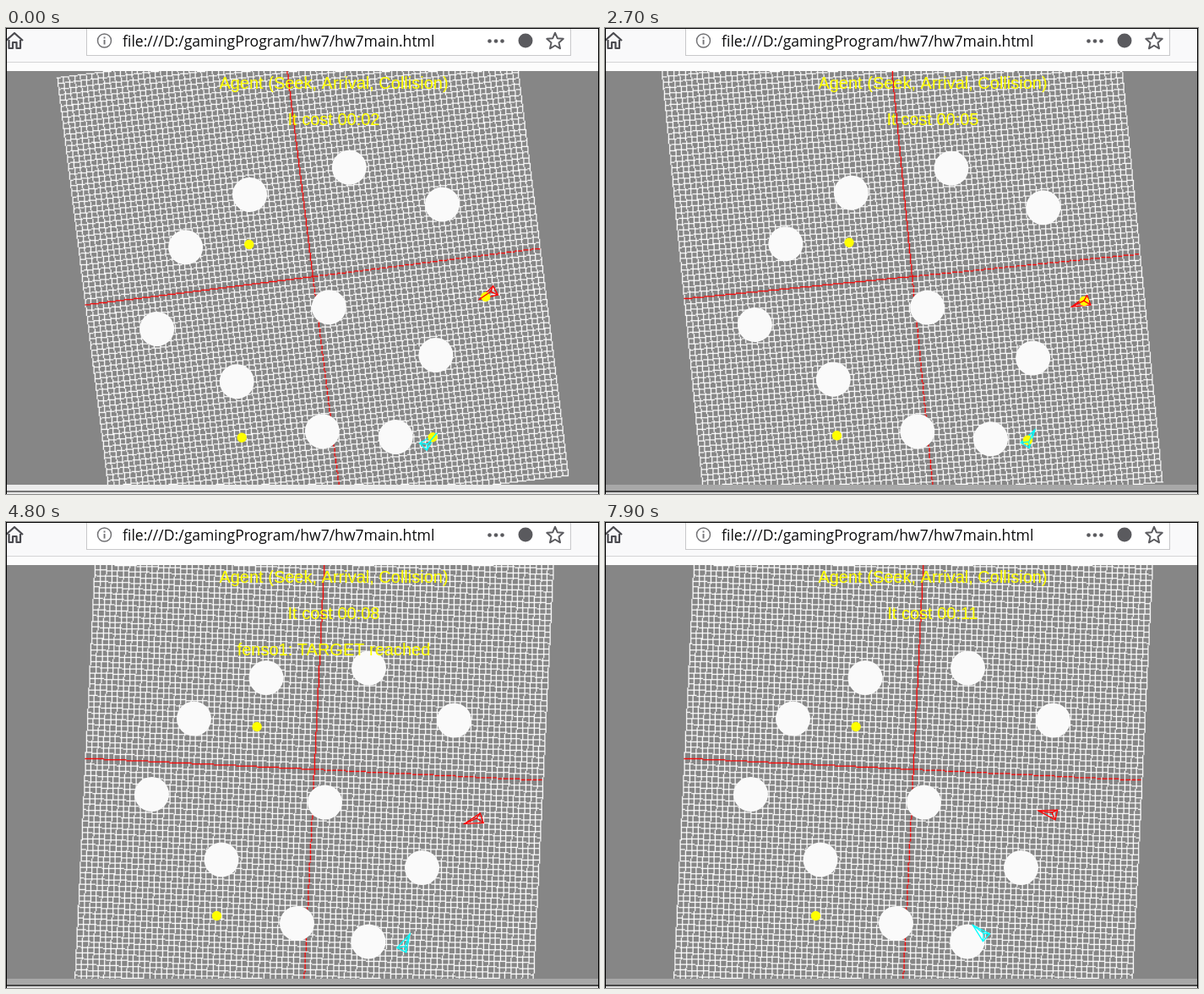
Write an HTML page with a canvas that moves like this. It is 702 px wide and 552 px high and loops after 8000 ms.

```html
<!DOCTYPE html>
<html lang="en">
<head>
<meta charset="utf-8">
<title>Agent demo</title>
<style>
html, body { margin: 0; width: 100%; height: 100%; overflow: hidden; background: #f9f9fa; }
canvas { display: block; width: 702px; height: 552px; }
</style>
</head>
<body>
<canvas id="stage" width="702" height="552"></canvas>
<script>
const ctx = document.getElementById('stage').getContext('2d');
const LOOP = 8000, STEP = 100, RAD = Math.PI / 180;
const VIEW = { x: 1, y: 51, w: 700, h: 490 };
const REST = 2.76;            // final view angle; local places are given at it
const SCALE = 1.25, HALF = 271, CELLS = 80;

// [ms, view angle]
const TURN = [[2500, -7.1], [2600, -6.25], [2700, -5.6], [2800, -2.4],
              [2900, 0.9], [3000, 2.2], [3100, REST]];
// [ms, x, y, heading]
const RED = [[0, 199.9, 56.6, 161], [800, 196.5, 59.3, 169], [1600, 194.6, 60.4, 172],
             [2600, 193, 60.7, 170], [2900, 190.9, 60.4, 162], [4800, 187.9, 61, 161.6],
             [5400, 185, 60, 172], [6300, 176.5, 56.8, 187], [6600, 173.7, 55.8, 188.5],
             [7900, 158.7, 51.5, 193]];
const CYAN = [[0, 102.9, 214.7, -35], [800, 107.8, 212.8, -45], [1600, 109.8, 211.4, -50],
              [2600, 110.8, 209.5, -49], [2900, 109, 208.6, -51], [4800, 108.1, 204.5, -63],
              [5400, 104.5, 204, -95], [6300, 93, 201.3, -140], [6600, 89.9, 199.8, -144],
              [7900, 78.4, 192, -137.6]];
const BALLS = [[64.4, -120], [165.4, -58], [-57.1, -108.5], [-142.6, -60], [-192.6, 29.5],
               [12.4, 39], [127.4, 116.5], [-110.1, 107], [-20.6, 182.5], [63.9, 204]];
const DOTS = [[-68, -50.5], [-115.6, 173.5]];
const GOALS = [[197.2, 58.5], [107.1, 211.8]];

const REACHED = 4700, MESSAGE_END = 5700, BAR_CHANGE = 2400;

function track(keys, t) {
  if (t <= keys[0][0]) return keys[0].slice(1);
  for (let i = 1; i < keys.length; i++) {
    const a = keys[i - 1], b = keys[i];
    if (t <= b[0]) {
      const k = (t - a[0]) / (b[0] - a[0]);
      return a.slice(1).map((v, j) => v + (b[j + 1] - v) * k);
    }
  }
  return keys[keys.length - 1].slice(1);
}

function rect(x, y, w, h, color) {
  ctx.fillStyle = color;
  ctx.fillRect(x, y, w, h);
}

function disc(x, y, r, color) {
  ctx.fillStyle = color;
  ctx.beginPath();
  ctx.arc(x, y, r, 0, 7);
  ctx.fill();
}

function poly(points, closed) {
  ctx.beginPath();
  points.forEach(([x, y]) => ctx.lineTo(x, y));
  if (closed) ctx.closePath();
  ctx.stroke();
}

// Grid with hard pixel lines, kept until the angle changes
const low = document.createElement('canvas');
low.width = VIEW.w / SCALE;
low.height = VIEW.h / SCALE;
const lowCtx = low.getContext('2d');
const image = lowCtx.createImageData(low.width, low.height);
const pixels = new Uint32Array(image.data.buffer);
const GRAY = 0xff868686, WHITE = 0xffffffff, CRIMSON = 0xff0000ff;
let gridAngle = null;

function pixelLine(x0, y0, x1, y1, color) {
  const n = Math.ceil(Math.max(Math.abs(x1 - x0), Math.abs(y1 - y0)));
  for (let i = 0; i <= n; i++) {
    const x = Math.floor(x0 + (x1 - x0) * i / n);
    const y = Math.floor(y0 + (y1 - y0) * i / n);
    if (x >= 0 && y >= 0 && x < low.width && y < low.height) pixels[y * low.width + x] = color;
  }
}

function buildGrid(angle, cx, cy) {
  if (angle === gridAngle) return;
  gridAngle = angle;
  pixels.fill(GRAY);
  const ox = (cx - VIEW.x) / SCALE, oy = (cy - VIEW.y) / SCALE, half = HALF / SCALE;
  const c = Math.cos(angle * RAD), s = Math.sin(angle * RAD);
  const line = (u0, v0, u1, v1, color) => pixelLine(
    ox + u0 * c - v0 * s, oy + u0 * s + v0 * c,
    ox + u1 * c - v1 * s, oy + u1 * s + v1 * c, color);
  for (let i = 0; i <= CELLS; i++) {
    const k = -half + 2 * half * i / CELLS;
    const color = i * 2 === CELLS ? CRIMSON : WHITE;
    line(-half, k, half, k, color);
    line(k, -half, k, half, color);
  }
  lowCtx.putImageData(image, 0, 0);
}

function agent([x, y, heading], color, inner) {
  const tip = [10.8, 0], left = [-10.8, -6], right = [-10.8, 6], hub = [-5, 1.5];
  ctx.save();
  ctx.translate(x, y);
  ctx.rotate(heading * RAD);
  ctx.strokeStyle = color;
  ctx.lineWidth = 1.3;
  if (inner) {
    poly([tip, hub, left]);
    poly([hub, right]);
  } else {
    poly([tip, left, right], true);
  }
  ctx.restore();
}

function scene(t) {
  const [angle] = track(TURN, t);
  const k = (angle + 7.1) / 9.86;
  const cx = 363.4 + 1.7 * k, cy = 294.5 - 1.5 * k;
  buildGrid(angle, cx, cy);

  ctx.save();
  ctx.beginPath();
  ctx.rect(VIEW.x, VIEW.y, VIEW.w, VIEW.h);
  ctx.clip();
  ctx.drawImage(low, VIEW.x, VIEW.y, VIEW.w, VIEW.h);
  ctx.translate(cx, cy);
  ctx.rotate((angle - REST) * RAD);
  BALLS.forEach(([x, y]) => disc(x, y, 20.5, '#fafafa'));
  const red = track(RED, t), cyan = track(CYAN, t);
  agent(red, '#f00', false);
  agent(cyan, '#0ff', false);
  const dots = t < REACHED ? DOTS.concat(GOALS) : DOTS;
  dots.forEach(([x, y]) => disc(x, y, 5.7, '#ff0'));
  agent(red, '#f00', true);
  agent(cyan, '#0ff', true);
  ctx.restore();
}

function label(text, y) {
  ctx.fillText(text, 388, y);
}

function captions(t) {
  const seconds = 2 + Math.max(0, Math.floor((t - 350) / 880) + 1);
  ctx.font = '20px "Liberation Sans", Arial, sans-serif';
  ctx.textAlign = 'center';
  ctx.fillStyle = '#ff0';
  label('Agent (Seek, Arrival, Collision)', 72);
  label('It cost 00:' + String(seconds).padStart(2, '0'), 115);
  if (t >= REACHED && t < MESSAGE_END) label('fenso1: TARGET reached', 158);
}

function toolbar() {
  rect(0, 0, 702, 51, '#f9f9fa');
  rect(0, 40, 702, 1, '#d4d4d6');
  rect(0, 41, 702, 10, '#fcfcfc');
  rect(95, 0, 574, 33, '#c8c8ca');
  rect(96, 0, 572, 32, '#fff');

  ctx.strokeStyle = '#4a4a4f';
  ctx.lineJoin = 'round';
  ctx.lineWidth = 2.2;
  poly([[0, 15], [10, 6], [20, 15]]);
  poly([[3.5, 14], [3.5, 24], [8, 24], [8, 17], [12.5, 17], [12.5, 24], [17, 24], [17, 14]]);

  ctx.strokeStyle = '#737376';
  ctx.lineWidth = 1.5;
  ctx.beginPath();
  ctx.arc(116.5, 15, 8, 0, 7);
  ctx.stroke();
  rect(115.6, 10.5, 1.9, 2, '#737376');
  rect(115.6, 14, 1.9, 5.5, '#737376');

  for (let i = 0; i < 3; i++) disc(572.5 + i * 7.5, 15.5, 2.3, '#5a5a5e');
  disc(615, 15, 8.5, '#5a5a5e');

  const star = [];
  for (let i = 0; i < 10; i++) {
    const r = i % 2 ? 4.7 : 10.3, a = (i * 36 - 90) * RAD;
    star.push([650 + r * Math.cos(a), 16 + r * Math.sin(a)]);
  }
  ctx.strokeStyle = '#5a5a5e';
  ctx.lineWidth = 1.9;
  poly(star, true);
  ctx.lineJoin = 'miter';

  ctx.font = '17.57px "Open Sans", "Noto Sans", sans-serif';
  ctx.textAlign = 'left';
  ctx.fillStyle = '#0c0c0d';
  ctx.fillText('file:///D:/gamingProgram/hw7/hw7main.html', 138, 21.5);
}

function frame(t) {
  toolbar();
  scene(t);
  captions(t);
  const early = t < BAR_CHANGE;
  rect(0, 541, 702, 7, early ? '#ececec' : '#a8a8a8');
  rect(0, 548, 702, 2, early ? '#777' : '#484848');
  rect(0, 550, 702, 2, early ? '#e8e8e8' : '#dcdcdc');
  rect(0, 0, 702, 1, '#000');
  rect(0, 0, 1, 552, '#000');
  rect(701, 0, 1, 552, '#000');
}

const start = performance.now();
function tick() {
  const t = (performance.now() - start) % LOOP;
  frame(Math.floor(t / STEP) * STEP);
  requestAnimationFrame(tick);
}
tick();
</script>
</body>
</html>
```
